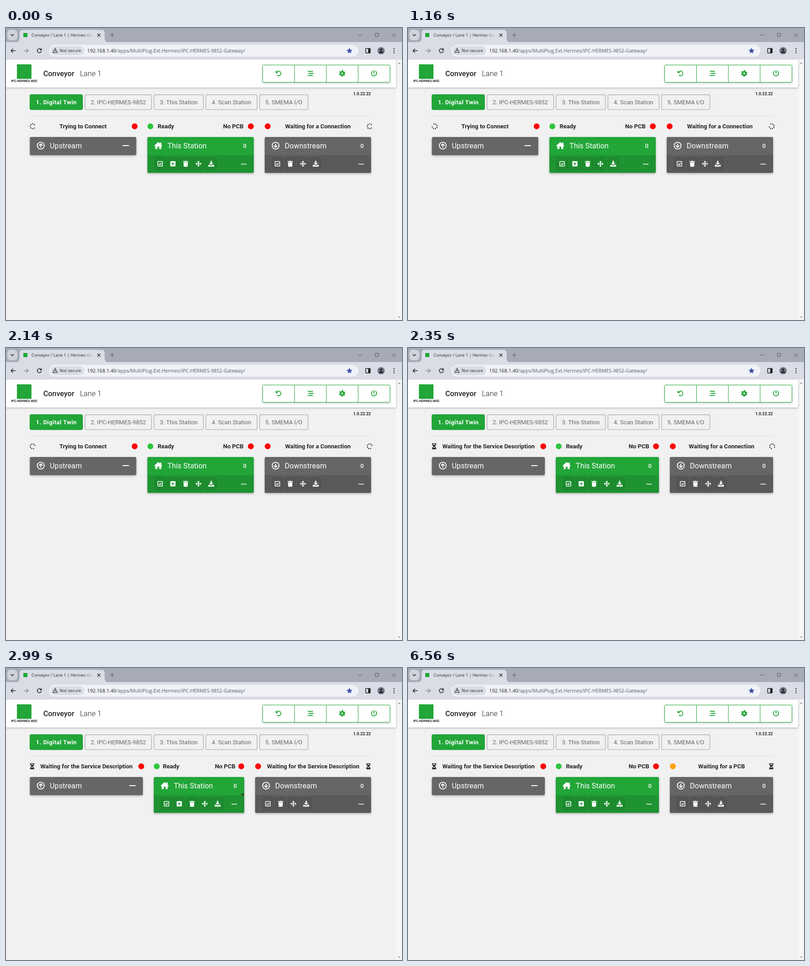
Animation of 871x643 px, one loop 8 s. Source, as an HTML page:

```html
<!DOCTYPE html>
<html lang="en">
<head>
<meta charset="utf-8">
<title>Conveyor / Lane 1</title>
<style>
html, body { margin: 0; width: 100%; height: 100%; overflow: hidden; background: #f1f1f1; }
svg { display: block; width: 871px; height: 643px; }
text { font-family: Roboto, sans-serif; white-space: pre; }
.ui { font-family: "Open Sans", "Noto Sans", sans-serif; }
.arial { font-family: "Liberation Sans", Arial, sans-serif; }
.card { filter: drop-shadow(0 2px 2px rgba(0,0,0,.28)); }
</style>
</head>
<body>
<svg id="stage" viewBox="0 0 871 643"></svg>
<script>
const GREEN = '#22a638', INK = '#212529', GREY = '#666';

const rect = (x, y, w, h, fill, more = '') =>
  `<rect x="${x}" y="${y}" width="${w}" height="${h}" fill="${fill}" ${more}/>`;
const dot = (x, y, r, fill, more = '') => `<circle cx="${x}" cy="${y}" r="${r}" fill="${fill}" ${more}/>`;
const line = (d, color, w = 1, more = '') =>
  `<path d="${d}" fill="none" stroke="${color}" stroke-width="${w}" ${more}/>`;
const fill = (d, color) => `<path d="${d}" fill="${color}" fill-rule="evenodd"/>`;
const at = (x, y, s, more = '') => `<g transform="translate(${x} ${y})" ${more}>${s}</g>`;
const text = (x, y, s, size = 13, weight = 400, color = INK, more = '') =>
  `<text x="${x}" y="${y}" font-size="${size}" font-weight="${weight}" fill="${color}" ${more}>${s}</text>`;
const MID = 'text-anchor="middle"', END = 'text-anchor="end"', ROUND = 'stroke-linecap="round" stroke-linejoin="round"';

// Icons, each centred on 0,0
const icon = {
  up: dot(0, 0, 7.6, 'none', 'stroke="#fff" stroke-width="1.9"') + line('M0 4.5V-3.6M-3.8 0L0-3.8 3.8 0', '#fff', 2),
  down: dot(0, 0, 7.6, 'none', 'stroke="#fff" stroke-width="1.9"') + line('M0-4.5V3.6M-3.8 0L0 3.8 3.8 0', '#fff', 2),
  home: fill('M0-8L9 .2 7.8 1.5 6.6.5V7.5H2V2.5H-2V7.5H-6.6V.5L-7.8 1.5-9 .2zM4-7H6.6V-2L4-4z', '#fff'),
  check: rect(-5.2, -5, 10.4, 10, 'none', 'rx="1" stroke="#fff" stroke-width="1.5"') + line('M-2.8 0L-.7 2.1 3-1.7', '#fff', 1.7),
  plus: rect(-5.7, -5.7, 11.4, 11.4, '#fff', 'rx="1.3"') + line('M-3 0H3M0-3V3', '#1f9331', 1.6),
  trash: fill('M-5.7-5.7H-2L-1.3-6.5H1.3L2-5.7H5.7V-4H-5.7zM-4.9-3.2H4.9L4.3 5.5Q4.2 6.5 3.2 6.5H-3.2Q-4.2 6.5-4.3 5.5z', '#fff'),
  move: line('M-5 0H5M0-5V5', '#fff', 1.7) +
    fill('M0-6.7L2.8-3.6H-2.8zM0 6.7L2.8 3.6H-2.8zM-6.7 0L-3.6-2.8V2.8zM6.7 0L3.6-2.8V2.8z', '#fff'),
  save: fill('M-1.4-6.5H1.4V-2H4.6L0 2.8-4.6-2H-1.4zM-6.5 2.2H-2.6L0 4.4 2.6 2.2H6.5V6.3H-6.5z', '#fff'),
  hourglass: `<path transform="scale(.0254) translate(-192 -256)" fill="${INK}" d="M360 0H24C10.700 0 0 10.700 0 24v16c0 13.300 10.700 24 24 24 0 91 51 168 121 192C75 280 24 357 24 448c-13.300 0-24 10.700-24 24v16c0 13.300 10.700 24 24 24h336c13.300 0 24-10.700 24-24v-16c0-13.300-10.700-24-24-24 0-91-51-168-121-192C309 232 360 155 360 64c13.300 0 24-10.700 24-24V24c0-13.300-10.700-24-24-24zm-75 384H99c17-47 52-80 93-80s76 33 93 80zm0-256H99C92 108 88 87 88 64h208c0 23-4 45-11 64z"/>`,
  spinner: `<g class="spin">${[0, 1, 2, 3, 4, 5, 6].map(i =>
    dot(0, -5.4, 1.25, INK, `transform="rotate(${90 + i * 45})"`)).join('')}</g>`
};

function browser() {
  const tab = 'M22 31Q30 31 30 23V11Q30 4 37 4H210Q217 4 217 11V23Q217 31 225 31z';
  return rect(0, 0, 871, 40, '#a7abb7') + fill(tab, '#dadde5') + rect(0, 31, 871, 38, '#dadde5') +
    rect(3, 4, 22, 23, '#d0d3dc', 'rx="7"') + line('M10.500 13.800L14 17.200 17.500 13.800', '#222', 1.5) +
    rect(38, 11, 9, 9, GREEN) +
    `<linearGradient id="fade" gradientUnits="userSpaceOnUse" x1="170" x2="190"><stop stop-color="#25272b"/><stop offset="1" stop-color="#25272b" stop-opacity=".15"/></linearGradient>` +
    text(56, 19, 'Conveyor / Lane 1 | Hermes Ga', 9.1, 400, 'url(#fade)', 'class="ui"') +
    line('M201 12.500L207.500 19M207.500 12.500L201 19', '#25272b', 1.3) +
    line('M229 15.500H238M233.500 11V20', '#555b66', 1.1) +
    line('M775 15.500H783M849 11.500L857 19.500M857 11.500L849 19.500', '#555b66') +
    rect(812.5, 11.5, 7, 7, 'none', 'stroke="#555b66"') +
    line('M21 50H11M15.500 45.500L11 50 15.500 54.500', '#222', 1.5) +
    line('M39 50H49M44.500 45.500L49 50 44.500 54.500', '#858a94', 1.4) +
    line('M77.200 47.500A4.500 4.500 0 1 0 77.800 51M78 45V48.500H74.500', '#222', 1.5) +
    rect(95, 37, 680, 26, '#f0f2f8', 'rx="13"') + rect(98, 40, 74, 20, '#dadde5', 'rx="10"') +
    line('M108 45L113 54H103zM108 48V51M108 52V53', '#25272b', 1.1) +
    text(118, 53.3, 'Not secure', 9.3, 400, '#25272b', 'class="ui"') +
    text(178.5, 53.7, '192.168.1.40<tspan fill="#555b64">/apps/MultiPlug.Ext.Hermes/IPC-HERMES-9852-Gateway/</tspan>',
      10.73, 400, '#202226', 'class="ui"') +
    fill('M755.500 43.500L757.400 47.700 762 48.200 758.600 51.300 759.500 55.800 755.500 53.500 751.500 55.800 752.400 51.300 749 48.200 753.600 47.700z', '#3f51a5') +
    rect(791, 45, 10, 10, 'none', 'rx="1" stroke="#222" stroke-width="1.5"') + rect(796.5, 45, 5, 10, '#222') +
    dot(825, 50, 8, '#737985') + dot(825, 47.5, 2.5, '#22262f') + fill('M820 55Q820 51 825 51T830 55z', '#22262f') +
    [45.5, 50, 54.5].map(y => dot(853.5, y, 1.2, '#222')).join('');
}

function header() {
  const undo = line('M-4.200-3.200A5.200 5.200 0 1 1-3.800 3.700', GREEN, 1.8) + fill('M-6.500-6.500V-.800H-.800z', GREEN);
  const list = line('M-5.800-4.500H5.500M-4-.0H7M-5.800 4.500H5.500', GREEN, 1.8);
  const gear = dot(0, 0, 3.6, 'none', `stroke="${GREEN}" stroke-width="3.4"`) +
    dot(0, 0, 5.6, 'none', `stroke="${GREEN}" stroke-width="2.6" stroke-dasharray="3.2 2.664" transform="rotate(14)"`);
  const power = line('M-3.600-4.600A5.700 5.700 0 1 0 3.600-4.600M0-6.500V0', GREEN, 1.8, ROUND);
  return rect(0, 69, 871, 574, '#f1f1f1') + rect(858, 69, 13, 574, '#f6f6f6') +
    rect(0, 69, 858, 62, '#fff', 'style="filter:drop-shadow(0 1px 2px rgba(0,0,0,.3))"') +
    rect(0, 68, 871, 1.5, '#dadde5') +
    fill('M862 79L865 75.500 868 79zM862 635.500H868L865 639z', '#a0a0a0') +
    rect(24, 80, 32, 32, GREEN) +
    text(11.5, 119.3, 'IPC-HERMES-9852', 6.5, 700, '#222', 'class="arial"') +
    text(82, 106, 'Conveyor', 16.25, 500) + text(162.5, 106, 'Lane 1', 16.25, 300) +
    rect(564.5, 81.5, 280, 38, '#fff', `rx="2" stroke="${GREEN}" style="filter:drop-shadow(0 2px 2px rgba(0,0,0,.2))"`) +
    line('M634.500 81V120M704.500 81V120M774.500 81V120', GREEN) +
    [undo, list, gear, power].map((s, i) => at(599.5 + 70 * i, 100, s)).join('') +
    text(802.5, 148, '1.0.22.22', 9, 700, INK, END);
}

function tabs() {
  const items = [[173, 148, '2. IPC-HERMES-9852'], [325, 110, '3. This Station'],
    [439, 114, '4. Scan Station'], [557, 108, '5. SMEMA I/O']];
  return rect(52.5, 146.5, 116, 33.5, GREEN, 'rx="3" stroke="#1d9a32"') +
    text(110.7, 167.5, '1. Digital Twin', 13, 700, '#fff', MID + ' letter-spacing=".45"') +
    items.map(([x, w, s]) => rect(x + .7, 147, w - 1.4, 32.6, '#f1f1f1', 'rx="3" stroke="#b2b2b2" stroke-width="1.4"') +
      text(x + w / 2, 167.5, s, 13, 400, GREY, MID)).join('') +
    rect(52, 194, 751, 1, '#dcdcdc');
}

function card(x, right, color, dark, name, mark, tools) {
  const w = right - x;
  let s = `<g class="card">${rect(x, 240, w, tools ? 79 : 40, color, 'rx="3"')}`;
  if (tools) s += fill(`M${x} 280H${right}V316Q${right} 319 ${right - 3} 319H${x + 3}Q${x} 319 ${x} 316z`, dark);
  s += '</g>' + at(x + 24, 259, icon[mark]) + text(x + 44, 265, name, 16.25, 400, '#fff');
  if (!tools) return s + rect(right - 30, 258, 14, 2, '#fff');
  s += text(right - 16, 263.5, '0', 13, 500, '#fff', END) + rect(right - 28, 299, 12, 1.5, '#fff');
  tools.forEach((t, i) => {
    const cx = x + 28 + 28.1 * i;
    s += rect(cx - 11.5, 286, 23, 26, 'rgba(0,0,0,.04)', 'rx="5" stroke="#000" stroke-opacity=".18"') + at(cx, 299, icon[t]);
  });
  return s;
}

// Everything that depends on the connection states
function board(p) {
  const row = 216.5, base = 221;
  return at(p.left[0], row, icon[p.left[1]]) + text(p.left[2], base, p.left[3], 13, 700, INK, MID) +
    dot(p.a - 3.5, row, 6.5, 'red') +
    dot(p.b + 6.5, row, 6.5, '#2fc53c') + text(p.b + p.ready, base, 'Ready', 13, 700) +
    text(p.noPcb, base, 'No PCB', 13, 700, INK, END) + dot(p.c - 6.5, row, 6.5, 'red') +
    dot(p.c + 30.5, row, 6.5, p.lamp || 'red') +
    text(p.right[2], base, p.right[3], 13, 700, INK, MID) + at(p.right[0], row, icon[p.right[1]]) +
    card(52.5, p.a, GREY, '', 'Upstream', 'up') +
    card(p.b, p.c, GREEN, '#1f9331', 'This Station', 'home', ['check', 'plus', 'trash', 'move', 'save']) +
    card(p.c + 24, 803, GREY, '#5a5a5a', 'Downstream', 'down', ['check', 'trash', 'move', 'save']) +
    (p.speck ? line('M514.500 278.500H523', '#333') + rect(519, 276.5, 4, 4, '#333') : '');
}

const waitText = 'Waiting for the Service Description', linkText = 'Waiting for a Connection';
const wide = { a: 301, b: 325, c: 552, ready: 22.5, noPcb: 530.5, left: [57.5, 'hourglass', 177, waitText] };
const states = [
  { from: 0, a: 286.5, b: 311, c: 545, ready: 22.5, noPcb: 522.5,
    left: [58.7, 'spinner', 169.5, 'Trying to Connect'], right: [800, 'spinner', 686, linkText] },
  { ...wide, from: 2350, right: [801, 'spinner', 689.7, linkText] },
  { ...wide, from: 2990, c: 524, ready: 20, noPcb: 504.5, speck: true, right: [797, 'hourglass', 675.7, waitText] },
  { ...wide, from: 4890, lamp: '#ff9f0f', right: [799, 'hourglass', 689.7, 'Not Ready'] },
  { ...wide, from: 6560, lamp: '#ff9f0f', right: [799, 'hourglass', 689.7, 'Waiting for a PCB'] }
];

const stage = document.getElementById('stage');
stage.innerHTML = browser() + header() + tabs() + '<g id="board"></g>';
const boardNode = document.getElementById('board');
const start = performance.now();
let shown;

function frame() {
  const t = (performance.now() - start) % 8000;
  const state = states.filter(s => s.from <= t).pop();
  if (state !== shown) boardNode.innerHTML = board(shown = state);
  // The spinner pauses once, early in the loop
  const spinTime = t < 70 ? 0 : t < 470 ? 70 : t;
  for (const el of boardNode.querySelectorAll('.spin'))
    el.setAttribute('transform', `rotate(${45 + spinTime * .18})`);
  requestAnimationFrame(frame);
}
frame();
</script>
</body>
</html>
```
